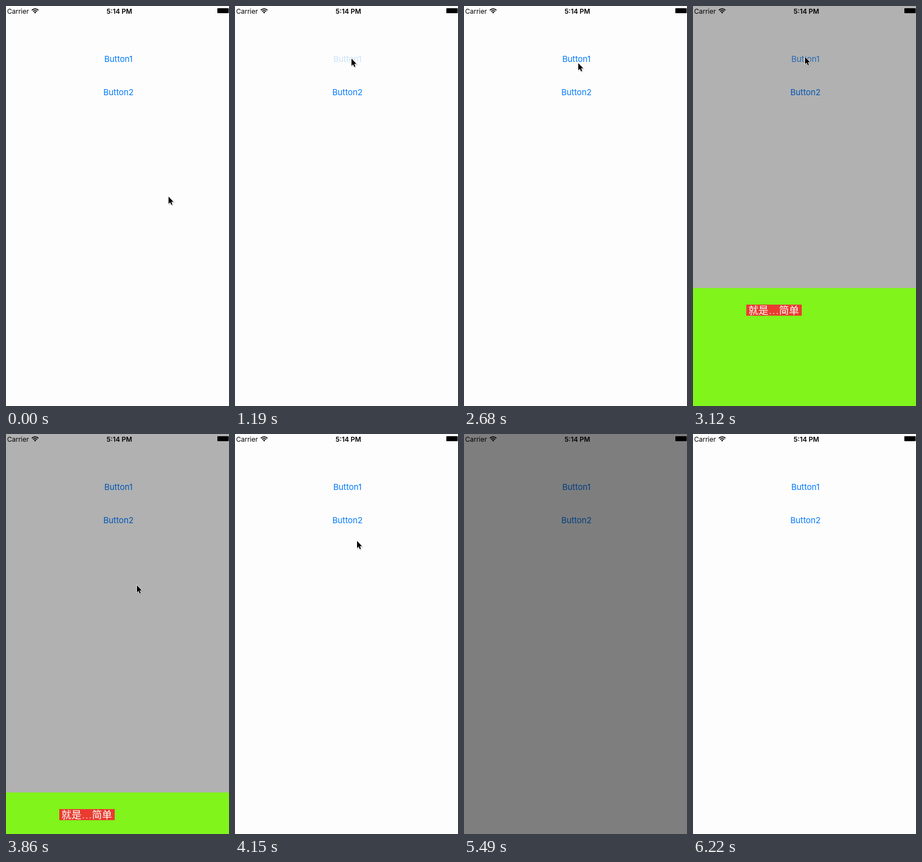
These frames come from a looping animation (402 by 722 pixels, 6370 ms). An HTML page:

```html
<!DOCTYPE html>
<html lang="zh-CN">
<head>
<meta charset="utf-8">
<title>Bottom sheets</title>
<style>
  html, body { margin: 0; width: 100%; height: 100%; overflow: hidden; background: #fdfdfd; }
  svg { display: block; width: 100vw; height: 100vh; }
  text { font-family: Inter, Roboto, sans-serif; }
  .status { font-size: 12px; }
  .button { font-size: 14.8px; fill: #007aff; text-anchor: middle; }
  .label { font-family: "Noto Sans CJK SC", "Noto Sans CJK", sans-serif; font-weight: 300; fill: #fff; }
  .latin { font-family: Inter, sans-serif; }
  .dots { letter-spacing: 1px; }
</style>
</head>
<body>
<svg viewBox="0 0 402 722">
  <defs>
    <path id="arrow" d="M0 0V13L2.9 10.3L4.9 15L7 14.1L5 9.5H9Z"/>
  </defs>
  <rect width="402" height="722" fill="#fdfdfd"/>
  <text id="button1" class="button" x="202.7" y="101">Button1</text>
  <text id="button2" class="button" x="202.7" y="161">Button2</text>
  <rect id="dim" width="402" height="722"/>

  <g class="status">
    <text x="2" y="14">Carrier</text>
    <text x="204.3" y="14" text-anchor="middle" font-weight="600">5:14 PM</text>
    <g fill="none" stroke="#000" stroke-width="1.8">
      <path d="M46.6 7.6a8.2 8.2 0 0 1 11.8 0"/>
      <path d="M48.8 9.9a5.2 5.2 0 0 1 7.4 0"/>
    </g>
    <path d="M52.5 13.6l-2-2.1a2.9 2.9 0 0 1 4 0z"/>
    <rect x="381" y="4" width="20.5" height="9" rx="1"/>
  </g>

  <g id="sheet1">
    <rect width="402" height="300" fill="#80f41b"/>
    <rect x="96" y="30" width="100" height="20" fill="#e93c2f"/>
    <text class="label" font-size="18" y="46.5"><tspan x="100">就是</tspan><tspan x="137" class="latin dots">...</tspan><tspan x="155">简单</tspan></text>
  </g>
  <g id="sheet2">
    <rect width="402" height="300" fill="#fff735"/>
    <rect x="26" y="20" width="300" height="20" fill="#80f41b"/>
    <text class="label" font-size="17" x="26" y="37">弹窗显示了，<tspan class="latin">6</tspan>不<tspan class="latin">6</tspan></text>
  </g>

  <g id="cursor">
    <use href="#arrow" x=".8" y="1.2" stroke="#000" stroke-width="1.6" opacity=".16"/>
    <use href="#arrow" stroke="#fff" stroke-width="1.6" stroke-linejoin="round" paint-order="stroke"/>
  </g>
</svg>
<script>
const LOOP = 6370, BEATS = 43, BOTTOM = 722;
const RISE = 3, FALL = 1.5, HOLD = 2; // durations in beats
const part = id => document.getElementById(id);

const popup1 = { button: part('button1'), sheet: part('sheet1'), top: 435, shade: .3, fade: 1 };
const popup2 = { button: part('button2'), sheet: part('sheet2'), top: 485, shade: .5, fade: 5 };
const visits = [
  { popup: popup1, open: 8, close: 14 },
  { popup: popup1, open: 19, close: 25 },
  { popup: popup2, open: 29.87, close: 35 }
];

const CURSOR_HIDES = 34;
const home = { x: 293, y: 344 };
const moves = [
  { from: 1, to: 6, x: 210, y: 95 },
  { from: 10, to: 13, x: 251, y: 245 },
  { from: 15, to: 18.6, x: 202, y: 92 },
  { from: 22, to: 23, x: 236, y: 273 },
  { from: 26, to: 29, x: 215, y: 165 },
  { from: 32, to: 33, x: 238, y: 287 }
];

const clamp = u => Math.min(1, Math.max(0, u));
const progress = (beat, from, length) => clamp((beat - from) / length);
const ease = u => u * u * (3 - 2 * u);

function place(el, x, y) {
  el.setAttribute('transform', `translate(${x} ${y})`);
}

function drawCursor(beat) {
  let { x, y } = home;
  for (const move of moves) {
    const u = ease(progress(beat, move.from, move.to - move.from));
    x += (move.x - x) * u;
    y += (move.y - y) * u;
  }
  const cursor = part('cursor');
  place(cursor, Math.round(x), Math.round(y));
  cursor.style.display = beat < CURSOR_HIDES ? '' : 'none';
}

function drawPopups(beat) {
  for (const { button, sheet } of [popup1, popup2]) {
    place(sheet, 0, BOTTOM);
    button.style.opacity = 1;
  }
  const visit = visits.findLast(v => beat >= v.open);
  if (!visit) return part('dim').style.opacity = 0;

  const { popup, open, close } = visit;
  const rise = ease(progress(beat, open, RISE));
  const fall = ease(progress(beat, close, FALL));
  place(popup.sheet, 0, Math.floor(BOTTOM - (BOTTOM - popup.top) * (rise - fall)));
  popup.button.style.opacity = .2 + .8 * rise;
  part('dim').style.opacity =
    beat > open ? popup.shade * (1 - progress(beat, close + HOLD, popup.fade)) : 0;
}

function draw(time) {
  // The picture advances in even beats; a small lead absorbs rounding.
  const beat = Math.floor((time % LOOP + 8) / LOOP * BEATS) % BEATS;
  drawCursor(beat);
  drawPopups(beat);
}

const start = performance.now();
function tick() {
  draw(performance.now() - start);
  requestAnimationFrame(tick);
}
tick();
</script>
</body>
</html>
```
